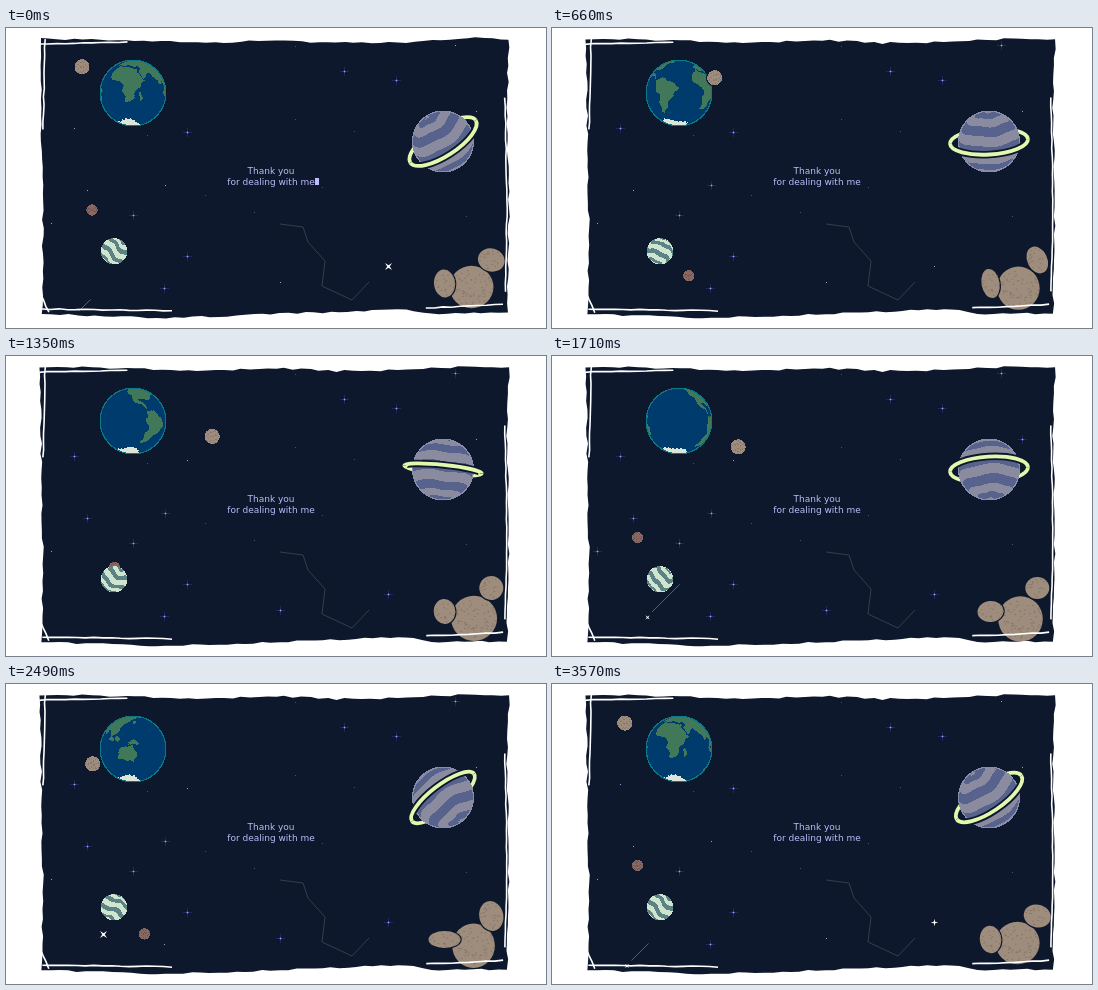
Animation of 540 by 300 pixels, one loop 3600 ms. Source, as an HTML page with a canvas:

```html
<!DOCTYPE html>
<html lang="en">
<head>
<meta charset="utf-8">
<title>Thank you</title>
<style>
  html, body { margin: 0; width: 100%; height: 100%; overflow: hidden; background: #fff; }
  canvas { display: block; }
</style>
</head>
<body>
<canvas id="stage" width="540" height="300"></canvas>
<script>
const LOOP = 3600, TAU = Math.PI * 2, NIGHT = '#0e182c';
const ctx = document.getElementById('stage').getContext('2d');
const { sin, cos, abs, sqrt, floor, atan2, asin } = Math;
const hash = n => { const v = sin(n * 12.9898 + 4.1) * 43758.5453; return v - floor(v); };

function polyline(c, pts) {
  c.beginPath();
  for (let i = 0; i < pts.length; i += 2) c.lineTo(pts[i], pts[i + 1]);
}

// Continents as longitude, latitude pairs; islands as centre and radii
const AFRICA = [-17,15, -6,35, 32,31, 43,12, 51,11, 40,-5, 33,-27, 20,-35, 9,4, -8,5];
const EURASIA = [-9,37, 5,60, 25,71, 105,77, 179,68, 142,54, 121,31, 108,10, 101,2, 90,22, 80,8, 73,20, 57,26, 44,13, 36,37];
const NORTH = [-168,66, -85,69, -56,52, -81,28, -97,27, -90,20, -78,8, -105,20, -125,45, -140,60];
const SOUTH = [-78,8, -60,9, -35,-7, -48,-27, -68,-55, -75,-50, -71,-20, -81,-6];
const AUSTRALIA = [114,-22, 131,-12, 142,-11, 153,-27, 148,-38, 116,-35];
const ISLANDS = [[-40,72,16,10], [113,1,5,5], [141,-5,9,4], [101,0,5,4], [47,-19,3,7], [138,37,4,5]];

const landMask = (() => {
  const c = Object.assign(document.createElement('canvas'), { width: 360, height: 180 }).getContext('2d');
  c.translate(180, 90);
  c.scale(1, -1);
  for (const pts of [AFRICA, EURASIA, NORTH, SOUTH, AUSTRALIA]) { polyline(c, pts); c.fill(); }
  for (const [x, y, rx, ry] of ISLANDS) {
    c.beginPath();
    c.ellipse(x, y, rx, ry, 0, 0, TAU);
    c.fill();
  }
  return c.getImageData(0, 0, 360, 180).data;
})();

// Per-pixel ball; paint(lat, lon, rim) returns a colour
function sphere(cx, cy, r, roll, tilt, spin, paint) {
  const cr = cos(roll), sr = sin(roll), ct = cos(tilt), st = sin(tilt);
  for (let y = floor(cy - r); y <= cy + r; y++) {
    for (let x = floor(cx - r); x <= cx + r; x++) {
      const dx = (x + .5 - cx) / r, dy = (y + .5 - cy) / r, d = dx * dx + dy * dy;
      if (d > 1) continue;
      const z = sqrt(1 - d), u = dx * cr + dy * sr, v = dy * cr - dx * sr;
      ctx.fillStyle = paint(asin(z * st - v * ct), atan2(u, z * ct + v * st) + spin, (1 - sqrt(d)) * r < 1.2);
      ctx.fillRect(x, y, 1, 1);
    }
  }
}

function earthColour(lat, lon, rim) {
  if (rim) return '#0c7886';
  const la = lat * 360 / TAU + 1.5 * sin(lon * 17);
  const lo = (lon * 360 / TAU + 2 * sin(lat * 19) + 900) % 360;
  if (la < -70 + 3 * sin(lon * 3) || la > 80) return '#dce6d8';
  const land = landMask[(floor(90 - la) * 360 + floor(lo)) * 4 + 3] > 127;
  return land ? '#41785a' : '#003b6d';
}
const bandColour = (lat, lon, rim) =>
  rim ? '#868eac' : sin(lat * 9.6 + .25 * sin(lon * 5) + 1.5) > 0 ? '#57638d' : '#8b8b9f';
const swirlColour = (lat, lon) =>
  sin(lat * 8 + 1.5 * sin(lon * 2) + .5 * sin(lon * 5)) > -.1 ? '#cfe5cf' : '#5c8284';
const rock = (base, spot) => (lat, lon) => sin(lat * 11 + sin(lon * 5)) * sin(lon * 8 + lat * 3) > .45 ? spot : base;
const moonColour = rock('#9f8c7d', '#87766b'), redColour = rock('#886860', '#6d5150');

function moon(x, y, r, spin, colour) {
  ctx.fillStyle = NIGHT;
  ctx.beginPath();
  ctx.arc(x, y, r + 1.3, 0, TAU);
  ctx.fill();
  sphere(x, y, r, .3, 0, spin, colour);
}

function ring(roll, open, front) {
  ctx.beginPath();
  ctx.ellipse(437, 113.5, 39, 39 * abs(open), roll, 0, Math.PI, front === open < 0);
  if (front) {
    ctx.strokeStyle = NIGHT;
    ctx.lineWidth = 7.5;
    ctx.stroke();
  }
  ctx.strokeStyle = '#e2f8ae';
  ctx.lineWidth = 3.8;
  ctx.stroke();
}

function ringedPlanet(a) {
  const roll = (-20 + 27 * sin(a - .5)) * TAU / 360, open = .42 * cos(a - .5);
  ring(roll, open, false);
  sphere(437, 113.5, 31, roll, asin(open), -a, bandColour);
  ring(roll, open, true);
}

// Stars: x, y, and for some the middle of the bright spell and half its length
const STARS = [
  [338,43], [390,52], [127,187], [181,228], [181,104,0,800], [68,100,1680,1500],
  [159,157,1740,1100], [158,260,900,1250], [274,254,1740,1050], [382,238,1740,1050],
  [81,162,1740,1050], [45,195,1800,400], [449,17,1500,1100], [470,83,1710,350]
];
const DOTS = [289,18, 141,107, 289,91, 348,103, 199,167, 248,184, 460,188, 316,159];
const SPARKLES = [[382,238,3600], [449,17,330], [68,100,990], [97,250,2490], [159,157,3090]];

const since = (t, t0) => ((t - t0 + LOOP * 1.5) % LOOP) - LOOP / 2;

function glint(x, y, size, turn) {
  ctx.save();
  ctx.translate(x + .5, y + .5);
  ctx.rotate(turn);
  ctx.fillStyle = '#fff';
  ctx.beginPath();
  for (let i = 0; i < 8; i++) {
    const r = i % 2 ? size * .25 : size;
    ctx.lineTo(r * cos(i * TAU / 8), r * sin(i * TAU / 8));
  }
  ctx.fill();
  ctx.restore();
}

function cross(x, y, arm, colour) {
  ctx.fillStyle = colour;
  ctx.fillRect(x - arm, y, arm * 2 + 1, 1);
  ctx.fillRect(x, y - arm, 1, arm * 2 + 1);
}

function stars(t) {
  for (let i = 0; i < DOTS.length; i += 2) cross(DOTS[i], DOTS[i + 1], 0, '#464c74');
  for (const [x, y, mid = 0, half = LOOP] of STARS) {
    if (abs(since(t, mid)) <= half) {
      cross(x, y, 4, '#22265c');
      cross(x, y, 1, '#5052a8');
    }
    cross(x, y, 0, '#9a9ce0');
  }
  for (const [x, y, peak] of SPARKLES) {
    const d = since(t, peak);
    if (abs(d) < 120) glint(x, y, 5 * (1 - abs(d) / 120), TAU / 8 * (1 + d / 30));
  }
}

// Slows down toward (x, y), always falling to the lower left
function meteor(t, x, y, end, k, width) {
  const left = end - t;
  if (left < 0 || left > 500) return;
  const off = k * left * left, length = 130 * k * left;
  const hx = x + off, hy = y - off, gap = 5 * width;
  ctx.strokeStyle = width > 1 ? '#b4bfcb' : '#53646b';
  ctx.lineWidth = width;
  ctx.beginPath();
  ctx.moveTo(hx + gap, hy - gap);
  ctx.lineTo(hx + gap + length, hy - gap - length);
  ctx.stroke();
  glint(hx, hy, 3 * width, width > 1 ? 0 : TAU / 8);
}

// Tumbling rocks: time, then radii and tilt of the right and the left one
const TUMBLE = [
  [0,    13.5, 11.5, .3,  10.5, 14, -.1],
  [330,  8, 15, -.3,      9.5, 15, -.25],
  [990,  12, 13, -.6,     8.5, 14.5, -.1],
  [1710, 12, 11, 0,       13, 10.5, -.1],
  [2490, 12, 15, -.2,     16, 8.5, 0],
  [3030, 17, 9, -.4,      13, 9.5, -.15]
];

function boulder(x, y, rx, ry, turn, seed) {
  ctx.save();
  ctx.translate(x, y);
  ctx.rotate(turn);
  ctx.beginPath();
  ctx.ellipse(0, 0, rx, ry, 0, 0, TAU);
  ctx.strokeStyle = NIGHT;
  ctx.lineWidth = 2.5;
  ctx.stroke();
  ctx.fillStyle = '#9e8c7c';
  ctx.fill();
  ctx.fillStyle = '#857567';
  for (let i = 0; i < rx * ry / 7; i++) {
    const r = sqrt(hash(i + seed)) * .92, a = hash(i + seed + 200) * TAU;
    ctx.fillRect(rx * r * cos(a), ry * r * sin(a), 1.5, 1);
  }
  ctx.restore();
}

function boulders(t, a) {
  const i = TUMBLE.findLastIndex(row => row[0] <= t);
  const from = TUMBLE[i], to = TUMBLE[i + 1] || TUMBLE[0];
  const k = (t - from[0]) / ((to[0] || LOOP) - from[0]);
  const p = from.map((v, j) => v + (to[j] - v) * k);
  boulder(467 - 1.5 * cos(a), 261 - 2 * cos(a), 22 - sin(a * 2), 22 - .8 * cos(a), 0, 1);
  boulder(438.5, 255.5, p[4], p[5], p[6], 50);
  boulder(485.3, 232, p[1], p[2], p[3], 90);
}

// Polyline broken into short, shaky pieces
function rough(pts, amount, seed) {
  const out = [];
  for (let i = 0; i + 3 < pts.length; i += 2) {
    const [x, y, x2, y2] = pts.slice(i, i + 4), n = Math.ceil(Math.hypot(x2 - x, y2 - y) / 9);
    for (let j = 0; j < n; j++) {
      const s = seed + i * 31 + j * 3.7;
      out.push(x + (x2 - x) * j / n + (hash(s) - .5) * amount, y + (y2 - y) * j / n + (hash(s + .5) - .5) * amount);
    }
  }
  polyline(ctx, out);
}

const PANEL = [34,11, 120,12, 200,15, 270,12, 330,15, 400,14, 470,10, 503,12, 501,80, 503,180, 501,285,
  425,286, 400,281, 300,285, 160,290, 36,286, 37,200, 34,11];
const SCRATCHES = [[33,16, 130,14], [39,11, 37,110], [34,265, 46,291], [36,281, 175,283],
  [499,70, 501,180, 499,272], [420,280, 506,276]];
const CONSTELLATION = [274,196, 297,199, 302,214, 319,233, 316,258, 346,272, 363,254];

function draw(t) {
  const a = t / LOOP * TAU, pose = floor(t / 90) % 4 * .011;
  ctx.fillStyle = '#fff';
  ctx.fillRect(0, 0, 540, 300);
  ctx.save();
  rough(PANEL, 2, 7 + pose);
  ctx.fillStyle = NIGHT;
  ctx.fill();
  ctx.clip();

  stars(t);
  polyline(ctx, CONSTELLATION);
  ctx.strokeStyle = '#304049';
  ctx.lineWidth = 1;
  ctx.stroke();
  meteor(t, -55, 285, 1190, .004, 1.5);
  meteor(t, 225, 381, 3230, .004, 1.5);
  for (const shift of [0, 1800]) meteor(t % 1800 + shift, 62, 294, 1866, .00136, 1);

  const bigMoon = () => moon(126.5 - 50.5 * cos(a) + 62.1 * sin(a), 65.4 - 26.6 * cos(a) - 5.3 * sin(a), 7.5, a, moonColour);
  const moonInFront = cos(a - .68) > 0;
  if (!moonInFront) bigMoon();
  sphere(127, 65, 33.5, .13, -.28, .56 - a, earthColour);
  if (moonInFront) bigMoon();

  const b = a * 2;
  const redMoon = () => moon(114 - 28 * cos(b) + 5.5 * sin(b), 218.3 - 36.3 * cos(b) + 7 * sin(b), 5.6, b, redColour);
  const redInFront = cos(b - 1.36) > 0;
  if (!redInFront) redMoon();
  sphere(108, 223.3, 13.2, .6, .1, -a, swirlColour);
  if (redInFront) redMoon();

  ringedPlanet(a);
  boulders(t, a);

  ctx.fillStyle = '#bcbcfa';
  ctx.font = '9px "DejaVu Sans", sans-serif';
  ctx.textAlign = 'center';
  ctx.fillText('Thank you', 265, 146);
  ctx.fillText('for dealing with me', 265, 157);
  if (t % 900 < 450) ctx.fillRect(309, 150, 4, 7);
  ctx.restore();

  ctx.strokeStyle = '#fff';
  ctx.lineWidth = 1.6;
  SCRATCHES.forEach((line, i) => { rough(line, .9, 60 + i * 9 + pose); ctx.stroke(); });
}

let shown = -1;
function tick() {
  const t = floor(performance.now() % LOOP / 30) * 30;
  if (t !== shown) draw(shown = t);
  requestAnimationFrame(tick);
}
tick();
</script>
</body>
</html>
```
